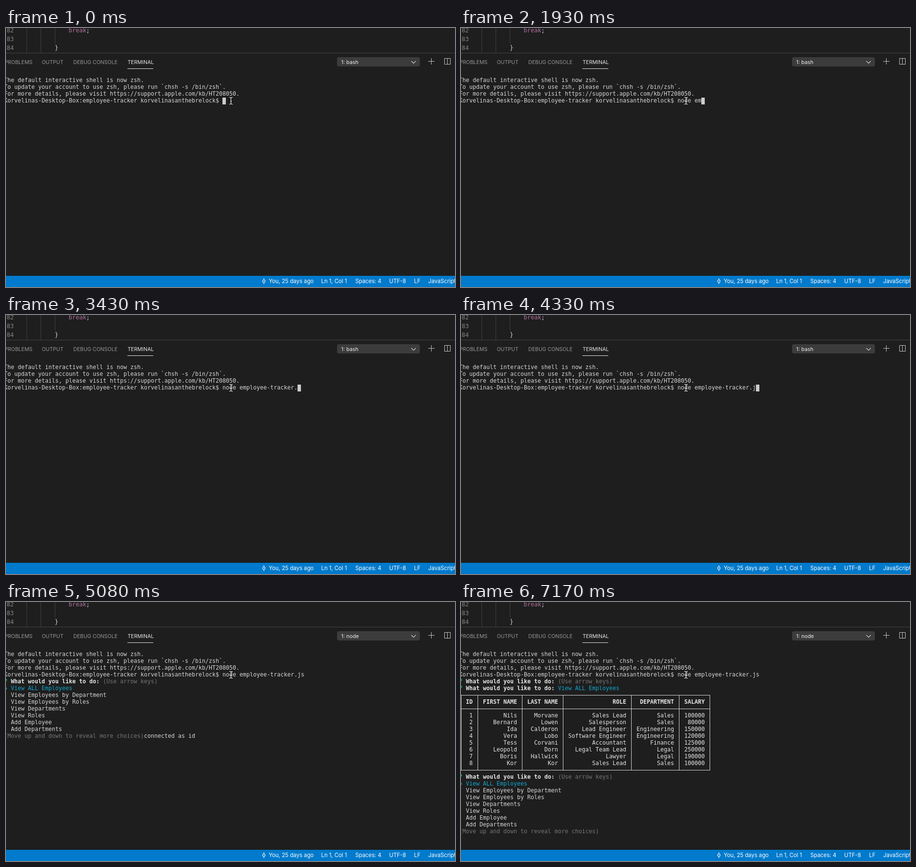
These frames come from a looping animation (921x532 px, 8000 ms). An HTML page with a canvas:

```html
<!DOCTYPE html>
<html lang="en">
<head>
<meta charset="utf-8">
<title>Employee tracker in a terminal</title>
<style>
  html, body { margin: 0; width: 100%; height: 100%; overflow: hidden; background: #1e1e1e; }
  canvas { display: block; }
</style>
</head>
<body>
<canvas id="stage" width="921" height="532"></canvas>
<script>
const ctx = document.getElementById('stage').getContext('2d');
const LOOP = 8000;
const MONO = '"DejaVu Sans Mono", monospace';
const SANS = 'Inter, sans-serif';
const FG = '#d6d6d6', WHITE = '#e5e5e5', DIM = '#767676', CYAN = '#11a8cd', GREEN = '#0dbc79';

// Terminal grid: 7 x 14 px cells
const colX = col => -4 + 7 * col;
const rowY = row => 101 + 14 * row;

const PROMPT = 'Korvelinas-Desktop-Box:employee-tracker korvelinasanthebrelock$ ';
const COMMAND = 'node employee-tracker.js';
// [time, characters typed]; tab completion makes the jump to 22
const KEYS = [[600, 1], [750, 2], [890, 3], [1040, 4], [1190, 5], [1780, 6], [1930, 7],
  [2530, 8], [2830, 9], [3430, 22], [4330, 23], [4480, 24]];
const ENTER = 4630, MENU = 5080, TABLE = 6720, MENU_AGAIN = 7170;

const CHOICES = ['View ALL Employees', 'View Employees by Department', 'View Employees by Roles',
  'View Departments', 'View Roles', 'Add Employee', 'Add Departments'];

const HEADER = ['ID', 'FIRST NAME', 'LAST NAME', 'ROLE', 'DEPARTMENT', 'SALARY'];
const STAFF = [
  ['Nils', 'Morvane', 'Sales Lead', 'Sales', 100000],
  ['Bernard', 'Lowen', 'Salesperson', 'Sales', 80000],
  ['Ida', 'Calderon', 'Lead Engineer', 'Engineering', 150000],
  ['Vera', 'Lobo', 'Software Engineer', 'Engineering', 120000],
  ['Tess', 'Corvani', 'Accountant', 'Finance', 125000],
  ['Leopold', 'Dorn', 'Legal Team Lead', 'Legal', 250000],
  ['Boris', 'Hallwick', 'Lawyer', 'Legal', 190000],
  ['Kor', 'Kor', 'Sales Lead', 'Sales', 100000],
];
const COLUMN_ENDS = [4, 17, 29, 49, 63, 72];

function text(str, x, y, color, font) {
  ctx.font = font;
  ctx.fillStyle = color;
  ctx.fillText(str, x, y);
}

function rect(x, y, w, h, color) {
  ctx.fillStyle = color;
  ctx.fillRect(x, y, w, h);
}

function stroke(path, color, width = 1) {
  ctx.strokeStyle = color;
  ctx.lineWidth = width;
  ctx.stroke(new Path2D(path));
}

function put(col, row, str, color = FG, weight = '') {
  text(str, colX(col), rowY(row) + 10, color, `${weight} 11.63px ${MONO}`);
}

const block = (col, row) => rect(colX(col), rowY(row), 7, 14, '#cccccc');

function drawEditor() {
  const code = `12px ${MONO}`;
  [82, 83, 84].forEach((n, i) => text(n, 1.5, 9 + 18 * i, '#858585', code));
  rect(42, 0, 1, 51, '#404040');
  rect(71, 0, 1, 51, '#404040');
  rect(100, 0, 1, 32, '#404040');
  text('break', 128.5, 9, '#b0709f', code);
  text(';', 164.6, 9, '#d4d4d4', code);
  text('}', 100, 45, '#d4d4d4', code);
}

function drawPanelBar(shell) {
  rect(0, 51, 921, 1, '#454545');
  const tab = `10.6px ${SANS}`;
  text('PROBLEMS', -3, 74, '#979797', tab);
  text('OUTPUT', 73.5, 74, '#979797', tab);
  text('DEBUG CONSOLE', 138, 74, '#979797', tab);
  text('TERMINAL', 249.5, 74, '#e7e7e7', tab);
  rect(249, 83, 53, 1, '#e7e7e7');

  ctx.fillStyle = '#3c3c3c';
  ctx.beginPath();
  ctx.roundRect(679, 60, 170, 19, 4);
  ctx.fill();
  text('1: ' + shell, 687.5, 74, '#f0f0f0', `10.8px ${SANS}`);
  stroke('M831.5 68 l4.5 4.5 l4.5 -4.5', '#d0d0d0', 1.2);
  stroke('M866 68.5 h13 M872.5 62 v13', '#c5c5c5');
  stroke('M899.5 62.5 h12 v12 h-12 z M905.5 62.5 v12', '#c5c5c5');
}

function drawStatusBar() {
  rect(0, 509, 921, 23, '#007acc');
  stroke('M529 514 v3.5 M529 522.5 v3.5 M526.5 520 a2.5 2.5 0 1 0 5 0 a2.5 2.5 0 1 0 -5 0', '#fff', 1.1);
  const items = [['You, 25 days ago', 539], ['Ln 1, Col 1', 646.5], ['Spaces: 4', 716.5],
    ['UTF-8', 786], ['LF', 837], ['JavaScript', 866]];
  for (const [label, x] of items) text(label, x, 524, '#fff', `11.3px ${SANS}`);
}

function drawQuestion(row, answer) {
  put(0, row, '?', GREEN, 'bold');
  put(2, row, 'What would you like to do:', WHITE, 'bold');
  put(29, row, answer || '(Use arrow keys)', answer ? CYAN : DIM);
}

function drawMenu(row) {
  drawQuestion(row);
  put(0, row + 1, '❯', CYAN);
  CHOICES.forEach((choice, i) => put(2, row + 1 + i, choice, i ? FG : CYAN));
  put(0, row + 8, '(Move up and down to reveal more choices)', DIM);
}

function drawTable() {
  const cells = (values, row, weight) => values.forEach((value, i) => {
    const str = String(value);
    put(COLUMN_ENDS[i] - str.length, row, str, WHITE, weight);
  });
  for (const y of [191, 219, 345]) rect(0, y, 511, 1, FG);
  rect(0, 191, 1, 155, FG);
  for (const end of COLUMN_ENDS) rect(colX(end + 1) + 3, 191, 1, 155, FG);
  cells(HEADER, 7, 'bold');
  STAFF.forEach((person, i) => cells([i + 1, ...person], 9 + i));
}

function drawTerminal(t) {
  put(0, 0, 'The default interactive shell is now zsh.');
  put(0, 1, 'To update your account to use zsh, please run `chsh -s /bin/zsh`.');
  put(0, 2, 'For more details, please visit https://support.apple.com/kb/HT208050.');
  const typed = KEYS.reduce((n, [time, count]) => t >= time ? count : n, 0);
  put(0, 3, PROMPT + COMMAND.slice(0, typed));

  if (t < ENTER) {
    block(PROMPT.length + typed, 3);
  } else if (t < MENU) {
    block(0, 4);
  } else if (t < TABLE) {
    drawMenu(4);
    put(41, 12, 'connected as id');
  } else {
    drawQuestion(4);
    drawQuestion(5, CHOICES[0]);
    drawTable();
    if (t < MENU_AGAIN) block(0, 18);
    else drawMenu(18);
  }
}

function drawPointer() {
  const beam = 'M458 142.5 h2 l1.5 1.5 l1.5 -1.5 h2 M461.5 144 v11 M458 156.5 h2 l1.5 -1.5 l1.5 1.5 h2 M460 150.5 h3';
  stroke(beam, '#1e1e1e', 2.6);
  stroke(beam, '#f0f0f0', 1.1);
}

function frame() {
  const t = performance.now() % LOOP;
  rect(0, 0, 921, 532, '#1e1e1e');
  drawEditor();
  drawPanelBar(t < ENTER ? 'bash' : 'node');
  drawTerminal(t);
  drawStatusBar();
  drawPointer();
  requestAnimationFrame(frame);
}
frame();
</script>
</body>
</html>
```
